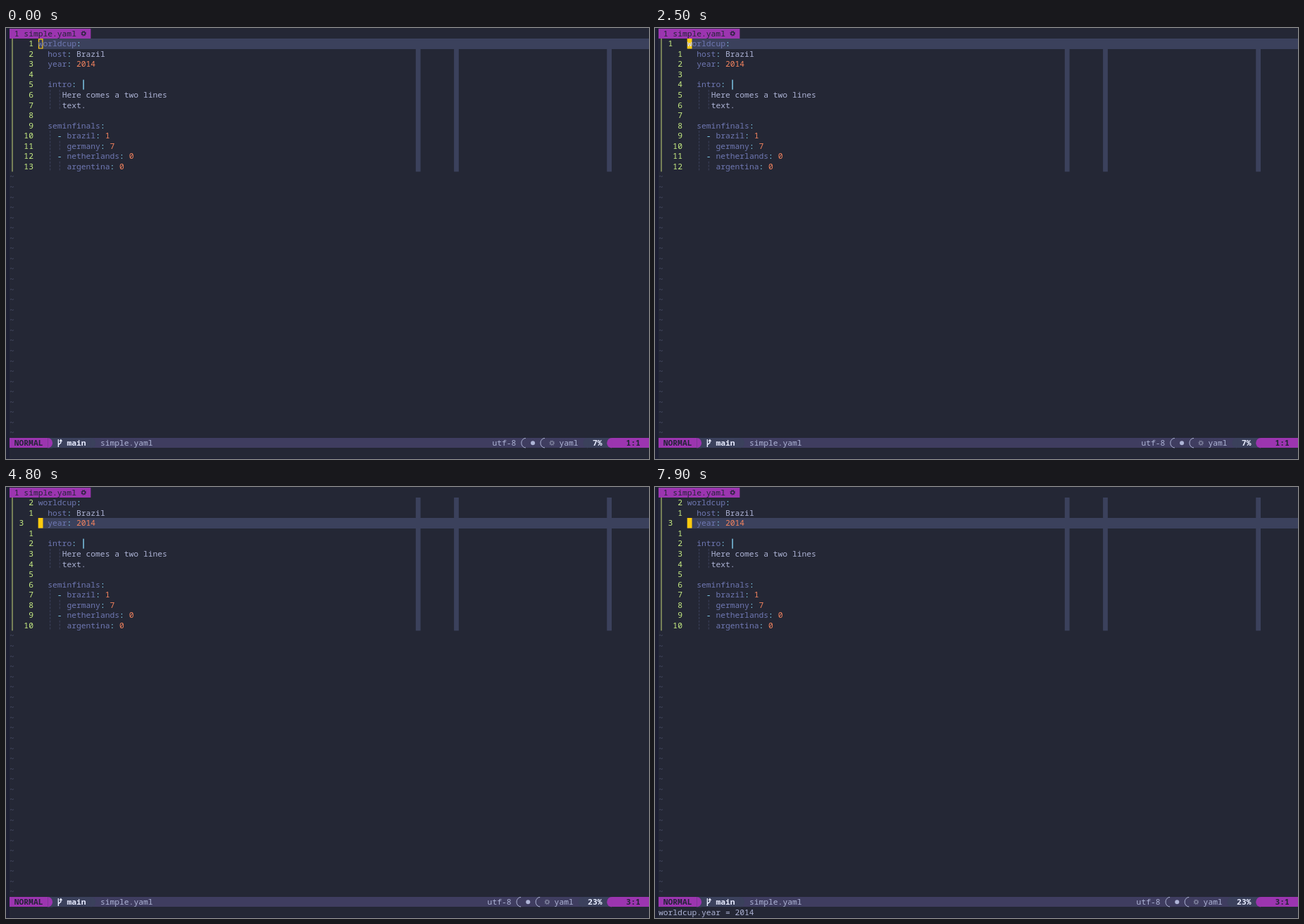
An HTML page with a canvas that plays this animation: 913x613 px, repeating every 8000 ms.

```html
<!DOCTYPE html>
<html lang="en">
<head>
<meta charset="utf-8">
<title>YAML editor</title>
<style>
html, body { margin: 0; width: 100%; height: 100%; overflow: hidden; background: #242735; }
canvas { display: block; }
</style>
</head>
<body>
<canvas id="stage" width="913" height="613"></canvas>
<script>
const ctx = document.getElementById('stage').getContext('2d');
const W = 913, H = 613, LOOP = 8000;
const CW = 6.786, RH = 14.56, LEFT = 5;
const C = {
  bg: '#242735', edge: '#1d1f33', line: '#3b415c', bar: '#3f3d60', dark: '#222436',
  purple: '#9c35b0', amber: '#ffc45e', cursor: '#ffcb0d', key: '#6f78b3', text: '#aeb4d6',
  cyan: '#89ddff', num: '#f5845f', lineNo: '#c8ee83', sign: '#8a9660', guide: '#3d435e',
  tilde: '#484d66', white: '#e8ecff', dim: '#80849f'
};

// Each line: list of [column, text, colour]
const pair = (col, key, value, colour) =>
  [[col, key, C.key], [col + key.length, ':', C.cyan], [col + key.length + 2, value, colour]];
const dash = [10, '-', C.cyan];
const lines = [
  pair(6, 'worldcup', '', C.text),
  pair(8, 'host', 'Brazil', C.text),
  pair(8, 'year', '2014', C.num),
  [],
  pair(8, 'intro', '', C.text),
  [[11, 'Here comes a two lines', C.text]],
  [[11, 'text.', C.text]],
  [],
  pair(8, 'seminfinals', '', C.text),
  [dash, ...pair(12, 'brazil', '1', C.num)],
  pair(12, 'germany', '7', C.num),
  [dash, ...pair(12, 'netherlands', '0', C.num)],
  pair(12, 'argentina', '0', C.num)
];
const guides = { 6: [8, 10], 7: [8, 10], 10: [8], 11: [8, 10], 12: [8], 13: [8, 10] };

// Time at which each character of the command appears
const command = ':YAMLView';
const keyTimes = [5000, 5200, 5300, 5400, 5500, 5800, 5950, 6050, 6150];
const FOCUS = 1700, DOWN = [2600, 3800], ENTER = 6700;

const colX = c => LEFT + c * CW;
const rowY = r => 0.5 + r * RH;

function rect(x, y, w, h, colour) {
  ctx.fillStyle = colour;
  ctx.fillRect(x, y, w, h);
}

function cells(col, row, n, colour) {
  const y = Math.round(rowY(row));
  rect(colX(col), y, n * CW, Math.round(rowY(row + 1)) - y, colour);
}

function put(col, row, text, colour, weight = 400) {
  ctx.font = `${weight} 11.31px "Noto Sans Mono", "DejaVu Sans Mono", monospace`;
  ctx.fillStyle = colour;
  ctx.fillText(text, colX(col), rowY(row) + 11.1);
}

function stroke(colour, width, draw, dashes = []) {
  ctx.strokeStyle = colour;
  ctx.lineWidth = width;
  ctx.setLineDash(dashes);
  ctx.beginPath();
  draw();
  ctx.stroke();
  ctx.setLineDash([]);
}

// Rounded end cap; side 1 bulges right, -1 bulges left
function cap(col, row, side, colour) {
  ctx.fillStyle = colour;
  ctx.beginPath();
  ctx.ellipse(colX(side > 0 ? col : col + 1), rowY(row) + RH / 2, CW, RH / 2, 0,
    -Math.PI / 2, Math.PI / 2, side < 0);
  ctx.fill();
}

function gear(col, row, colour) {
  const x = colX(col) + CW / 2, y = rowY(row) + RH / 2;
  stroke(colour, 1.2, () => ctx.arc(x, y, 2.2, 0, 7));
  stroke(colour, 1.1, () => ctx.arc(x, y, 3.2, 0, Math.PI * 2), [1.25, 1.26]);
}

function softSeparator(col, row) {
  stroke(C.text, 1, () => ctx.ellipse(colX(col + 1), rowY(row) + RH / 2, CW - 0.7, RH / 2 - 0.5,
    0, Math.PI / 2, Math.PI * 1.5));
}

function branch(col, row) {
  const x = colX(col) + 1.5, y = rowY(row);
  stroke(C.white, 1.4, () => {
    ctx.moveTo(x, y + 2);
    ctx.lineTo(x, y + 13);
    ctx.moveTo(x, y + 10);
    ctx.lineTo(x + 3.5, y + 7);
    ctx.lineTo(x + 3.5, y + 3);
    ctx.moveTo(x + 1.8, y + 5);
    ctx.lineTo(x + 3.5, y + 2.8);
    ctx.lineTo(x + 5.2, y + 5);
  });
}

function drawTab() {
  cells(0, 0, 17, C.purple);
  put(1, 0, '1', C.dark);
  put(3, 0, 'simple.yaml', C.dark);
  gear(15, 0, C.dark);
}

function drawBuffer(current, focused, inCommand) {
  for (const col of [85, 93, 125]) rect(colX(col), 15, CW, rowY(14) - 15, C.line);
  const top = Math.round(rowY(current));
  rect(colX(6), top, W, 15, C.line);
  rect(8.2, 15, 1.6, rowY(14) - 15, C.sign);

  if (!inCommand) {
    if (focused) rect(colX(6), top, CW, 14.5, C.cursor);
    else stroke(C.cursor, 1.2, () => ctx.rect(colX(6) + 0.8, top + 0.8, CW - 1.4, 13.2));
  }

  lines.forEach((parts, i) => {
    const row = i + 1, here = focused && row === current;
    const no = String(focused && !here ? Math.abs(row - current) : row);
    put(here ? 2 : 5 - no.length, row, no, C.lineNo, 500);
    for (const col of guides[row] || []) {
      const x = colX(col) + CW / 2;
      stroke(C.guide, 1, () => {
        ctx.moveTo(x, rowY(row));
        ctx.lineTo(x, rowY(row + 1));
      }, [3, 1.85]);
    }
    for (const [col, text, colour] of parts) put(col, row, text, colour);
  });
  if (focused && current === 1) put(6, 1, 'w', C.white);
  rect(colX(15) + 2.6, rowY(5) + 0.3, 1.3, 14, C.cyan);
  for (let row = 14; row < 40; row++) put(0, row, '~', C.tilde);
}

function drawStatus(current, inCommand) {
  const row = 40, mode = inCommand ? 'COMMAND' : 'NORMAL';
  const accent = inCommand ? C.amber : C.purple;
  const n = mode.length, percent = Math.floor(current / lines.length * 100) + '%';
  const p = 124 - percent.length;

  cells(0, row, 134, C.bar);
  cells(0, row, n + 11, C.line);
  cap(n + 11, row, 1, C.line);
  cells(0, row, n + 2, accent);
  rect(colX(n + 2), rowY(row), CW, RH, C.line);
  cap(n + 2, row, 1, accent);
  put(1, row, mode, C.dark, 700);
  branch(n + 4, row);
  put(n + 6, row, 'main', C.white, 600);
  put(n + 13, row, 'simple.yaml', C.text);

  put(p - 21, row, 'utf-8', C.text);
  softSeparator(p - 15, row);
  ctx.fillStyle = C.text;
  ctx.beginPath();
  ctx.arc(colX(p - 13) + CW / 2, rowY(row) + RH / 2, 3, 0, 7);
  ctx.fill();
  softSeparator(p - 11, row);
  gear(p - 9, row, C.dim);
  put(p - 7, row, 'yaml', C.text);

  cap(p - 2, row, -1, C.line);
  cells(p - 1, row, 127 - p, C.line);
  put(p, row, percent, C.white, 600);
  cap(125, row, -1, accent);
  cells(126, row, 8, accent);
  put(129, row, current + ':1', C.dark, 700);
}

function draw(t) {
  const current = 1 + DOWN.filter(d => t >= d).length;
  const inCommand = t >= keyTimes[0] && t < ENTER;

  rect(0, 0, W, H, C.bg);
  rect(0, 0, LEFT, H, C.edge);
  drawTab();
  drawBuffer(current, t >= FOCUS, inCommand);
  drawStatus(current, inCommand);

  if (inCommand) {
    const typed = command.slice(0, keyTimes.filter(k => t >= k).length);
    put(0, 41, typed, C.text);
    cells(typed.length, 41, 1, C.cursor);
  } else if (t >= ENTER) {
    put(0, 41, 'worldcup.year = 2014', C.text);
  }
  rect(0, 612, W, 1, C.edge);
}

const start = performance.now();
function tick() {
  draw((performance.now() - start) % LOOP);
  requestAnimationFrame(tick);
}
tick();
</script>
</body>
</html>
```
